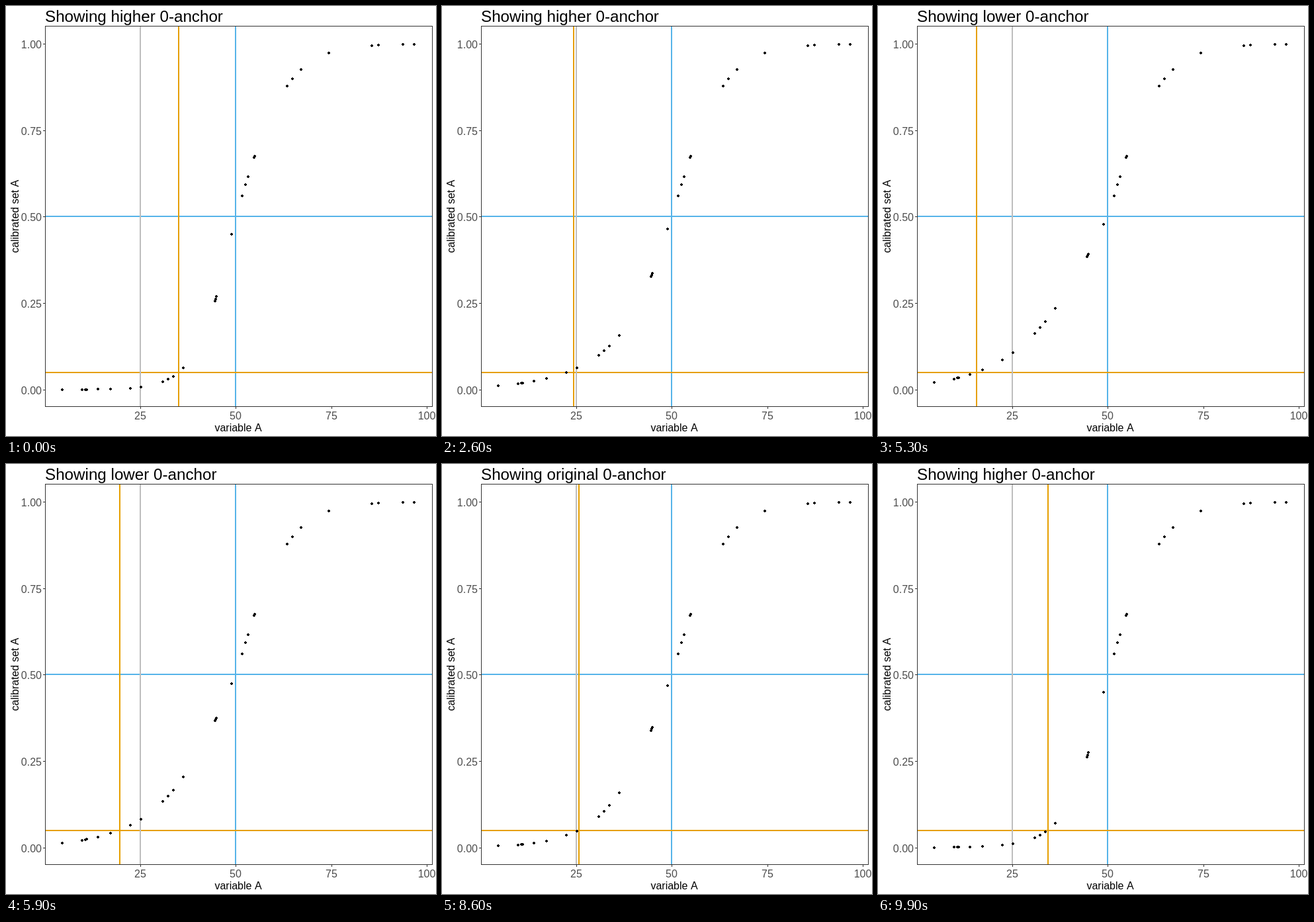
These frames come from a looping animation (650x650 px, 10000 ms). An HTML page with a canvas:

```html
<!DOCTYPE html>
<html lang="en">
<head>
<meta charset="utf-8">
<title>Calibration anchors</title>
<style>
  html, body { margin: 0; width: 100%; height: 100%; overflow: hidden; background: #fff; }
  canvas { display: block; width: 650px; height: 650px; }
</style>
</head>
<body>
<canvas id="plot" width="650" height="650"></canvas>
<script>
const ctx = document.getElementById("plot").getContext("2d");
const FONT = '"Liberation Sans", Arial, sans-serif';
const GREY = "#bebebe", ORANGE = "#e69f00", BLUE = "#56b4e9", FRAME = "#333333";
const panel = { left: 59, top: 30, right: 644, bottom: 605 };
const STEP = 100, FRAMES = 100, TWEEN = 15;

const states = [
  { name: "higher", anchor: 35 },
  { name: "lower", anchor: 15 },
  { name: "original", anchor: 25 }
];
// last frame of each state's rest
const restEnds = [18, 52, 85];

const values = [
  4.54, 9.74, 10.6, 10.95, 13.9, 17.19, 22.38, 25.16, 30.87, 32.26, 33.64, 36.24,
  44.56, 44.73, 44.9, 48.95, 51.66, 52.53, 53.22, 54.85, 54.97,
  63.44, 64.83, 67.08, 74.36, 85.62, 87.35, 93.76, 96.71
];

const px = v => 58.8 + 5.772 * v;
const py = v => 579.8 - 522.6 * v;
const mix = (a, b, t) => a + (b - a) * t;

function membership(v, anchor) {
  const span = v < 50 ? 50 - anchor : 20;
  return 1 / (1 + Math.exp(-Math.log(19) * (v - 50) / span));
}

function poseAt(frame) {
  let i = 0;
  while (i < 2 && frame >= restEnds[i] + TWEEN) i++;
  const step = Math.max(0, frame - restEnds[i]);
  const from = states[i], to = states[(i + 1) % 3];
  return { from, to, t: step / TWEEN, name: (step > 8 ? to : from).name };
}

function rect(color, x, y, w, h) {
  ctx.fillStyle = color;
  ctx.fillRect(x, y, w, h);
}

function text(str, x, y, size, color, align) {
  ctx.font = `${size}px ${FONT}`;
  ctx.fillStyle = color;
  ctx.textAlign = align;
  ctx.fillText(str, x, y);
}

const vline = (v, color) =>
  rect(color, Math.round(px(v)) - 1, panel.top, 2, panel.bottom - panel.top);
const hline = (y, color) =>
  rect(color, panel.left, y - 1, panel.right - panel.left, 2);

function dot(x, y) {
  rect("#000", x - 1, y - 2, 2, 4);
  rect("#000", x - 2, y - 1, 4, 2);
}

function drawAxes() {
  ctx.strokeStyle = FRAME;
  ctx.lineWidth = 1;
  ctx.strokeRect(panel.left + 0.5, panel.top + 0.5,
    panel.right - panel.left, panel.bottom - panel.top);
  for (const v of [0, 0.25, 0.5, 0.75, 1]) {
    const y = Math.round(py(v));
    rect(FRAME, 56, y, 3, 1);
    text(v.toFixed(2), 54, y + 7, 16, "#4d4d4d", "right");
  }
  for (const v of [25, 50, 75, 100]) {
    const x = Math.round(px(v));
    rect(FRAME, x, 606, 1, 3);
    text(String(v), x, 625, 16, "#4d4d4d", "center");
  }
  text("variable A", 351, 643, 16, "#000", "center");
  ctx.save();
  ctx.translate(19, 318);
  ctx.rotate(-Math.PI / 2);
  text("calibrated set A", 0, 0, 16, "#000", "center");
  ctx.restore();
}

function draw(frame) {
  const { from, to, t, name } = poseAt(frame);
  rect("#fff", 0, 0, 650, 650);
  hline(318, BLUE);
  vline(50, BLUE);
  hline(554, ORANGE);
  vline(mix(from.anchor, to.anchor, t), ORANGE);
  vline(25, GREY);
  for (const v of values) {
    const m = mix(membership(v, from.anchor), membership(v, to.anchor), t);
    dot(Math.round(px(v)), Math.round(py(m)));
  }
  drawAxes();
  text(`Showing ${name} 0-anchor`, 59, 24, 24.2, "#000", "left");
}

const start = performance.now();
function tick() {
  const elapsed = performance.now() - start;
  draw(Math.floor(elapsed / STEP) % FRAMES);
  requestAnimationFrame(tick);
}
tick();
</script>
</body>
</html>
```
